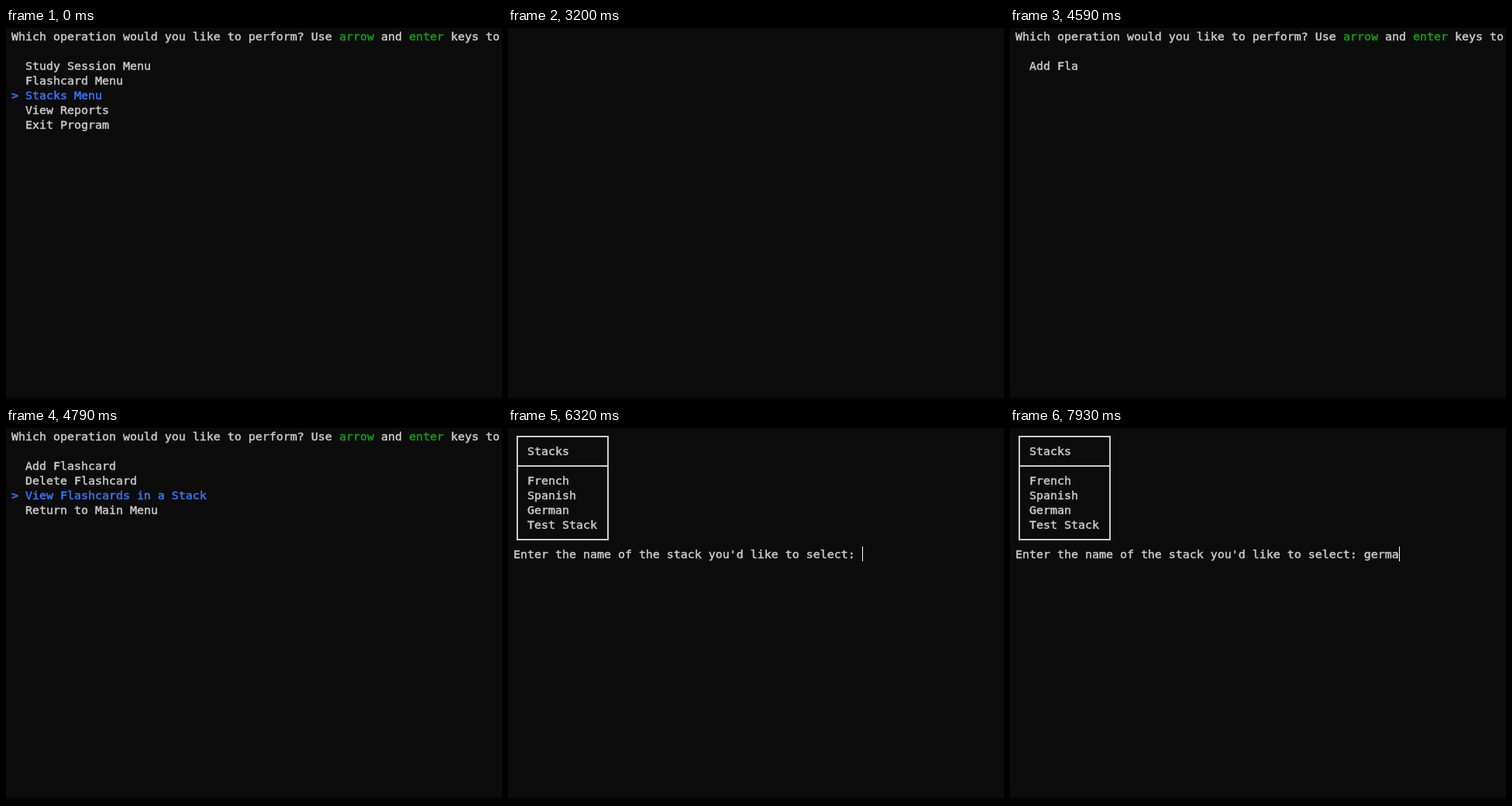
An HTML page that plays this animation: 640 by 480 pixels, repeating every 8 s.

```html
<!DOCTYPE html>
<html lang="en">
<head>
<meta charset="utf-8">
<title>Flashcard console</title>
<style>
  html, body { margin: 0; width: 100%; height: 100%; overflow: hidden; background: #0c0c0c; }
  svg { display: block; width: 640px; height: 480px; }
  text {
    font: 14.95px "DejaVu Sans Mono", monospace;
    white-space: pre;
    fill: currentColor;
    stroke: currentColor;
    stroke-width: 0.45;
  }
  #screen { color: #ccc; }
  .green { color: #13a10e; }
  .blue { color: #3b78ff; }
  .frame { fill: none; stroke: currentColor; stroke-width: 2; }
</style>
</head>
<body>
<svg viewBox="0 0 640 480">
  <rect width="640" height="480" fill="#0c0c0c"/>
  <rect y="477" width="640" height="3" fill="#080205"/>
  <g id="screen"></g>
</svg>
<script>
const LOOP = 8000, CELL_W = 9, CELL_H = 19, LEFT = 7, TOP = 1;
const MAIN = ["Study Session Menu", "Flashcard Menu", "Stacks Menu", "View Reports", "Exit Program"];
const CARDS = ["Add Flashcard", "Delete Flashcard", "View Flashcards in a Stack", "Return to Main Menu"];
const STACKS = ["French", "Spanish", "German", "Test Stack"];
const PROMPT = "Enter the name of the stack you'd like to select: ";
const screen = document.getElementById("screen");

const colX = col => LEFT + col * CELL_W;
const rowY = row => TOP + row * CELL_H;

function put(col, row, str, cls = "") {
  const safe = str.replace(/&/g, "&amp;").replace(/</g, "&lt;").replace(/>/g, "&gt;");
  return `<text class="${cls}" x="${colX(col)}" y="${rowY(row) + 15}">${safe}</text>`;
}

function header() {
  return put(0, 0, "Which operation would you like to perform? Use") +
    put(47, 0, "arrow", "green") + put(53, 0, "and") +
    put(57, 0, "enter", "green") + put(63, 0, "keys to");
}

function menu(items, selected) {
  return header() + items.map((item, i) => i === selected
    ? put(0, i + 2, "> " + item, "blue")
    : put(2, i + 2, item)).join("");
}

function stackPrompt(typed, cursor) {
  const col = PROMPT.length + typed.length;
  return `<path class="frame" d="M12 11H129V144H12ZM12 49H129"/>` +
    put(2, 1, "Stacks") +
    STACKS.map((name, i) => put(2, i + 3, name)).join("") +
    put(0, 8, PROMPT + typed) +
    (cursor ? `<rect x="${colX(col)}" y="${rowY(8)}" width="1" height="${CELL_H}" fill="#fff"/>` : "");
}

// Each step: start time in ms and what the terminal shows from then on.
const steps = [
  [0, () => menu(MAIN, 2)],
  [1020, () => menu(MAIN, 1)],
  [3200, () => ""],
  [3270, () => menu(CARDS, 0)],
  [4590, () => menu(["Add Fla"], -1)],
  [4680, () => menu(CARDS, 1)],
  [4790, () => menu(CARDS, 2)],
  [5190, () => stackPrompt("", true)],
  [5790, () => stackPrompt("", false)],
  [6320, () => stackPrompt("", true)],
  [6950, () => stackPrompt("", false)],
  [7450, () => stackPrompt("", true)],
  [7520, () => stackPrompt("g", true)],
  [7710, () => stackPrompt("ge", true)],
  [7780, () => stackPrompt("ger", true)],
  [7860, () => stackPrompt("germ", true)],
  [7930, () => stackPrompt("germa", true)]
];

let shown = null;
function update(ms) {
  const step = steps.findLast(([start]) => start <= ms);
  if (step === shown) return;
  shown = step;
  screen.innerHTML = step[1]();
}

const begin = performance.now();
function tick() {
  update((performance.now() - begin) % LOOP);
  requestAnimationFrame(tick);
}
tick();
</script>
</body>
</html>
```
